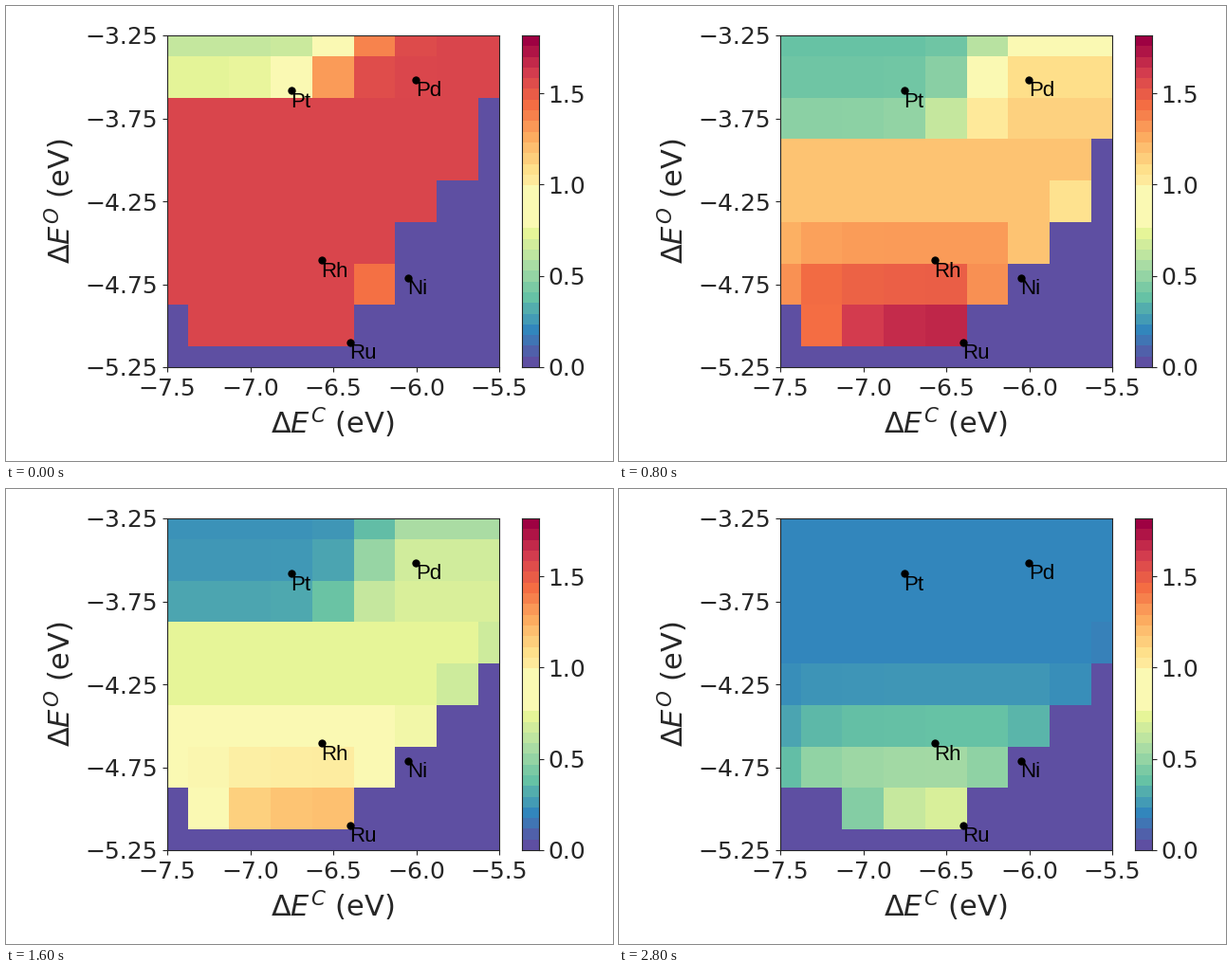
These frames come from a looping animation (640 px wide and 480 px high, 3 s). A matplotlib script:

```python
import matplotlib.pyplot as plt
import numpy as np
from matplotlib.animation import FuncAnimation
from matplotlib.colors import LinearSegmentedColormap, ListedColormap

W, H, DPI = 640, 480, 100
FRAMES, STEP = 15, 200
LEVELS, VMAX = 31, 1.817
INK = "#262626"

plt.rcParams.update({
    "font.family": "DejaVu Sans", "mathtext.fontset": "dejavusans",
    "axes.edgecolor": INK, "xtick.color": INK, "ytick.color": INK,
    "text.color": INK, "xtick.labelsize": 18, "ytick.labelsize": 18,
})

# Spectral bands with one flat pale-yellow stretch in the middle
bands = plt.get_cmap("Spectral_r")(np.linspace(0, 1, LEVELS))[:, :3]
bands[13:17] = np.array([250, 249, 179]) / 255
bar_map = ListedColormap(bands)
cell_map = LinearSegmentedColormap.from_list("cells", bands, N=601)

row, col = np.mgrid[0:9, 0:9]


def heat_levels(t):
    """Colour level of every cell at frame t; row 0 is the top."""
    early = max(0, 1 - t / 2)
    late = max(0, (t - 10) / 8)

    # The broad plateau cools steadily
    main = np.interp(t, (0, 2, 4, 6, 8, 10, 14),
                     (26.5, 25.3, 19.7, 14.5, 12, 8, 3))

    # The top left corner follows a colder, exponential decay
    cold = np.maximum(3, 10.3 * np.exp(-t / 7.5) + 1.2 * early * row)
    centre = 5.4 - 0.45 * row - early * (0.9 + 0.35 * row)
    share = (1 - 0.03 * row**2) / (1 + np.exp((col - centre) / 0.4))
    share = np.maximum(share, 0.35 * (1 - early) / (1 + row)**1.5)
    depth = 3 if 1 <= t <= 9 else 2
    share = np.where(row < depth, share, 0)
    level = main + share * (cold - main)

    # The lower rows stay hotter, less so at their left end
    start = np.where(row == 7, 1 if t < 9 else 2, 0)
    below = np.maximum(0, row - 4 + late)
    gain = 2.3 * below**1.25 * min(1, t / 4) * (1 - 0.015 * t)
    level = level + gain * (1 - 0.5 * np.exp(-(col - start) / 0.8))

    # A staircase bounds the active area; its middle steps open late
    step = (col == 11 - row) & (row > 2) & (row < 7)
    level = np.where(step, 0.9 * level, level)
    opening = 5 - 2.7 * np.abs(row - 3.3)
    end = np.minimum(9, 12 - row) - (t < opening)
    active = (col >= start) & (col < end) & (row < 8)
    return np.where(active, level, 0)


fig = plt.figure(figsize=(W / DPI, H / DPI), dpi=DPI, facecolor="white")


def panel(left, top, width, height):
    return fig.add_axes([left / W, 1 - (top + height) / H, width / W, height / H])


def signed(value, digits):
    return f"{value:.{digits}f}".replace("-", "\u2212")


ax = panel(170, 31, 350, 350)
heat = ax.imshow(heat_levels(0), cmap=cell_map, vmin=0, vmax=LEVELS - 1,
                 extent=(-7.625, -5.375, -5.375, -3.125),
                 interpolation="nearest", aspect="auto")
xs, ys = np.arange(-7.5, -5.4, 0.5), np.arange(-5.25, -3.2, 0.5)
ax.set_xticks(xs, [signed(v, 1) for v in xs])
ax.set_yticks(ys, [signed(v, 2) for v in ys])
ax.tick_params(axis="x", pad=4.5)
ax.set_xlim(-7.5, -5.5)
ax.set_ylim(-5.25, -3.25)

for name, x, y in (("Pt", -6.754, -3.584), ("Pd", -6.004, -3.516),
                   ("Rh", -6.571, -4.607), ("Ni", -6.051, -4.71),
                   ("Ru", -6.4, -5.1)):
    ax.plot(x, y, "o", color="black", ms=6, mew=0)
    ax.annotate(name, (x, y), xytext=(0, -0.85), textcoords="offset points",
                ha="left", va="top", color="black", fontsize=16,
                family="Liberation Sans")

fig.text(344.5 / W, 1 - 451 / H, r"$\Delta E^C$ (eV)", fontsize=22,
         ha="center", va="baseline")
fig.text(68 / W, 1 - 205.5 / H, r"$\Delta E^O$ (eV)", fontsize=22, rotation=90,
         rotation_mode="anchor", ha="center", va="baseline")

bar = panel(544, 31, 18, 350)
bar.imshow(np.arange(LEVELS)[:, None], cmap=bar_map, origin="lower",
           extent=(0, 1, 0, VMAX), interpolation="nearest", aspect="auto")
bar.set_xticks([])
bar.yaxis.tick_right()
bar.set_yticks([0, 0.5, 1, 1.5], ["0.0", "0.5", "1.0", "1.5"])
bar.set_ylim(0, VMAX)


def update(i):
    heat.set_data(heat_levels(i))
    return [heat]


anim = FuncAnimation(fig, update, frames=FRAMES, interval=STEP,
                     repeat=True, repeat_delay=0)
plt.show()
```
